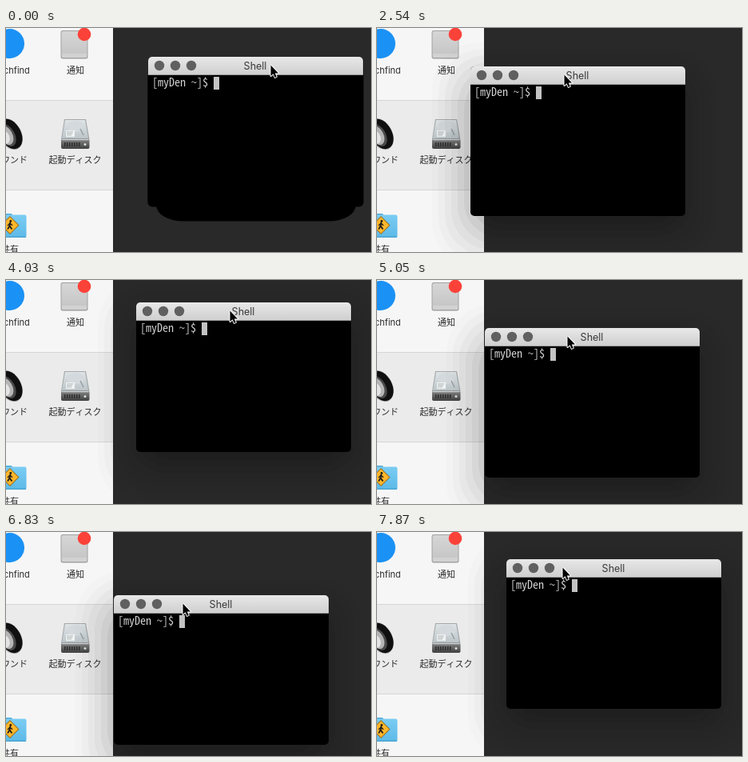
Write an HTML page with a canvas that moves like this. It is 457x280 px and loops after 8000 ms.

```html
<!DOCTYPE html>
<html lang="ja">
<head>
<meta charset="utf-8">
<title>Window drag</title>
<style>
html, body { margin: 0; width: 100%; height: 100%; overflow: hidden; background: #292929; }
canvas { display: block; width: 457px; height: 280px; }
</style>
</head>
<body>
<canvas id="stage"></canvas>
<script>
const W = 457, H = 280, LOOP = 8000, EDGE = 134;
const WIN = { w: 269, h: 187, bar: 23 };
const STEPS = 48, GRAB_X = 153, GRAB_Y = 10;
const STOP = EDGE + 1, LEAK = 0.85, LIMIT = 24;
const UI = 'Inter, "Noto Sans CJK JP", "Noto Sans CJK", sans-serif';
const MONO = '"Noto Sans Mono CJK JP", "Noto Sans Mono", "DejaVu Sans Mono", monospace';
const PROMPT = '[myDen ~]$';
const CELL = 7;

const canvas = document.getElementById('stage');
const ratio = window.devicePixelRatio || 1;
canvas.width = W * ratio;
canvas.height = H * ratio;
const ctx = canvas.getContext('2d');

// Turning points of the hand: step, pointer x, window top
const HAND = [
  [-1, 331, 36], [0, 328, 36], [4, 288, 42], [10, 251, 51], [12, 234, 48],
  [14, 219, 49], [15, 219, 49], [18, 256, 64], [20, 293, 52], [22, 280, 28],
  [23, 262, 26], [29, 238, 60], [34, 231, 13], [40, 223, 82], [41, 221, 79],
  [43, 205, 57], [47, 245, 33], [48, 232, 34]
];

// Monotone cubic through the points, rounded to whole pixels
function hand(step, col) {
  const slope = k => {
    const a = HAND[k], b = HAND[k + 1];
    return a && b ? (b[col] - a[col]) / (b[0] - a[0]) : 0;
  };
  const tangent = k => {
    const l = slope(k - 1), r = slope(k);
    return l * r > 0 ? 2 * l * r / (l + r) : 0;
  };
  let k = 0;
  while (k < HAND.length - 2 && step >= HAND[k + 1][0]) k++;
  const a = HAND[k], b = HAND[k + 1], d = b[0] - a[0], u = (step - a[0]) / d, v = 1 - u;
  return Math.round(a[col] + (b[col] - a[col]) * u * u * (3 - 2 * u)
    + d * u * v * (tangent(k) * v - tangent(k + 1) * u));
}

// The window follows the pointer but sticks at the panel edge:
// pulling left builds up a leaking force, and past LIMIT it slips free.
function simulate() {
  const poses = [];
  let pointer = hand(-1, 1), x = pointer - GRAB_X, pull = 0;
  for (let step = -1; step <= STEPS; step++) {
    const now = hand(step, 1), next = x + now - pointer;
    pull *= LEAK;
    if (x >= STOP && next < STOP) {
      pull += STOP - next;
      x = pull > LIMIT ? STOP - 1 : STOP;
    } else {
      x = next;
    }
    pointer = now;
    poses.push({ x, y: hand(step, 2), pointer });
  }
  return poses;
}
const POSES = simulate();

function stepAt(t) {
  let step = -1, next = 740;
  while (step < STEPS && t >= next) {
    step++;
    next += step >= 20 && step < 35 ? 145 : 150;
  }
  return step;
}

function rect(x, y, w, h, fill) {
  ctx.fillStyle = fill;
  ctx.fillRect(x, y, w, h);
}

function round(x, y, w, h, r, fill) {
  ctx.beginPath();
  ctx.roundRect(x, y, w, h, r);
  ctx.fillStyle = fill;
  ctx.fill();
}

function oval(x, y, rx, ry, fill, turn = 0) {
  ctx.beginPath();
  ctx.ellipse(x, y, rx, ry, turn, 0, Math.PI * 2);
  ctx.fillStyle = fill;
  ctx.fill();
}

function poly(points, fill) {
  ctx.beginPath();
  points.forEach(([x, y]) => ctx.lineTo(x, y));
  ctx.closePath();
  ctx.fillStyle = fill;
  ctx.fill();
}

function diamond(x, y, r, fill) {
  poly([[x, y - r], [x + r, y], [x, y + r], [x - r, y]], fill);
}

function line(points, color, width) {
  ctx.beginPath();
  points.forEach(([x, y]) => ctx.lineTo(x, y));
  ctx.strokeStyle = color;
  ctx.lineWidth = width;
  ctx.stroke();
}

function fade(y0, y1, from, to) {
  const g = ctx.createLinearGradient(0, y0, 0, y1);
  g.addColorStop(0, from);
  g.addColorStop(1, to);
  return g;
}

function text(str, x, y, font, fill, align = 'center') {
  ctx.font = font;
  ctx.fillStyle = fill;
  ctx.textAlign = align;
  ctx.fillText(str, x, y);
}

function drawNotice() {
  round(68.5, 3, 34, 35.5, 2.5, '#a2a2a2');
  round(69.5, 4, 32, 33, 2, fade(4, 37, '#d6d6d6', '#c4c4c4'));
  rect(70, 32, 31, 5, '#d2d2d2');
  oval(98, 8, 8.3, 8.3, '#fb4239');
}

function drawSpeaker() {
  const tilt = -0.5;
  oval(5, 132.5, 14, 21, '#a5a5a5', tilt);
  oval(5.5, 132.5, 13.2, 20, '#101010', tilt);
  oval(2, 134, 9, 15, '#4a4a4a', tilt);
  oval(0, 134, 8, 13, '#b5b5b5', tilt);
  oval(-2, 136, 6, 9, '#e4e4e4', tilt);
}

function drawDisk() {
  poly([[73, 114], [100, 114], [104.5, 139], [69, 139]], '#a3a8aa');
  poly([[74, 115], [99, 115], [103, 138], [70, 138]], fade(115, 138, '#dfe4e6', '#bcc5c9'));
  oval(87, 123, 11, 7, '#d3d9dc');
  rect(75, 128, 11, 8, '#f0f3f3');
  for (let k = 0; k < 3; k++) rect(76, 129.5 + k * 2, 8 - k, 0.8, '#a0a6a8');
  line([[97, 134], [93, 126]], '#98a0a3', 1.5);
  round(69, 138.5, 35.5, 12.5, 2, fade(139, 151, '#858585', '#3f3f3f'));
  rect(70, 139, 33.5, 1.2, '#d2d6d8');
  for (let k = 0; k < 7; k++) rect(73 + k * 3, 143, 1.5, 5, '#2d2d2d');
  oval(99, 145.5, 1.5, 1.5, '#d5e3d5');
}

function drawShare() {
  round(-14, 232, 22, 8, 2, '#4fa9d8');
  round(-14, 233.5, 39.5, 28.5, 2, fade(234, 262, '#7accf3', '#5cb9e7'));
  rect(-14, 260.5, 39, 1.5, '#4ca5d3');
  diamond(5, 246.5, 11.5, '#9a6a18');
  diamond(5, 246.5, 10.2, '#ffb62b');
  oval(5.8, 241.5, 1.4, 1.4, '#1a1a1a');
  line([[5.3, 243], [4.6, 247.5], [7.4, 251.5]], '#1a1a1a', 1.8);
  line([[4.6, 247.5], [2, 251.5]], '#1a1a1a', 1.6);
  line([[2, 247], [5, 244], [8, 246.7]], '#1a1a1a', 1.2);
}

function drawPanel() {
  rect(0, 0, W, H, '#292929');
  rect(0, 0, EDGE, H, '#f6f6f6');
  rect(0, 90, EDGE, 113, '#d6d6d6');
  rect(0, 91, EDGE, 111, '#ebebeb');
  oval(4.5, 19.5, 18.5, 18.5, '#1a91f5');
  drawNotice();
  drawSpeaker();
  drawDisk();
  drawShare();
  const label = (str, x, y) => text(str, x, y, '11px ' + UI, '#2c2c2c');
  label('Torchfind', 5, 57);
  label('通知', 87, 57);
  label('サウンド', 5, 169);
  label('起動ディスク', 86.5, 169);
  label('共有', 5, 281);
}

function drawShadow(x, y) {
  for (let k = 0; k < 8; k++) {
    const e = 48 - 8 * k;
    round(x - e, y + 18 - e, WIN.w + 2 * e, WIN.h + 2 * e, 40 + e * 0.4,
      `rgba(0,0,0,${0.012 + 0.007 * k})`);
  }
}

function drawWindow(x, y, resting) {
  const { w, h, bar } = WIN;
  if (resting) {
    const bend = { x: 34, y: 20 };
    round(x + 10, y + 80, w - 19, 125.5, [0, 0, bend, bend], '#000');
    round(x - 0.7, y + bar, w + 1.4, h - bar + 0.5, [0, 0, 6, 6], '#000');
  } else {
    drawShadow(x, y);
  }
  round(x, y, w, h, 5, '#000');
  round(x, y, w, bar - 0.5, [5, 5, 0, 0], fade(y, y + bar, '#e8e8e8', '#cecece'));
  rect(x, y + bar - 1, w, 0.7, '#b0b0b0');
  for (let k = 0; k < 3; k++) oval(x + 14 + 20 * k, y + 11, 6.2, 6.2, '#606060');
  text('Shell', x + 134, y + 16, '12.5px ' + UI, '#3a3a3a');

  ctx.font = '14px ' + MONO;
  const size = Math.min(14, 14 * CELL / ctx.measureText('M').width);
  text(PROMPT, x + 5, y + 37, size + 'px ' + MONO, '#d2d2d2', 'left');
  rect(x + 82, y + 25, CELL, 16, '#c3c3c3');
}

function drawPointer(x, y) {
  const tip = [[0, 0], [0, 13.5], [3.1, 10.7], [5.2, 15.4], [7.3, 14.4], [5.3, 9.9], [9.5, 9.9]];
  const points = tip.map(([px, py]) => [x + px, y + py]);
  ctx.lineJoin = 'round';
  line([...points, points[0]], '#fff', 2);
  poly(points, '#000');
}

function draw(t) {
  const step = stepAt(t);
  const { x, y, pointer } = POSES[step + 1];
  ctx.setTransform(ratio, 0, 0, ratio, 0, 0);
  drawPanel();
  drawWindow(x, y, step < 0);
  drawPointer(pointer + 0.5, y + GRAB_Y + 0.5);
}

const start = performance.now();
function tick() {
  draw((performance.now() - start) % LOOP);
  requestAnimationFrame(tick);
}
tick();
</script>
</body>
</html>
```
